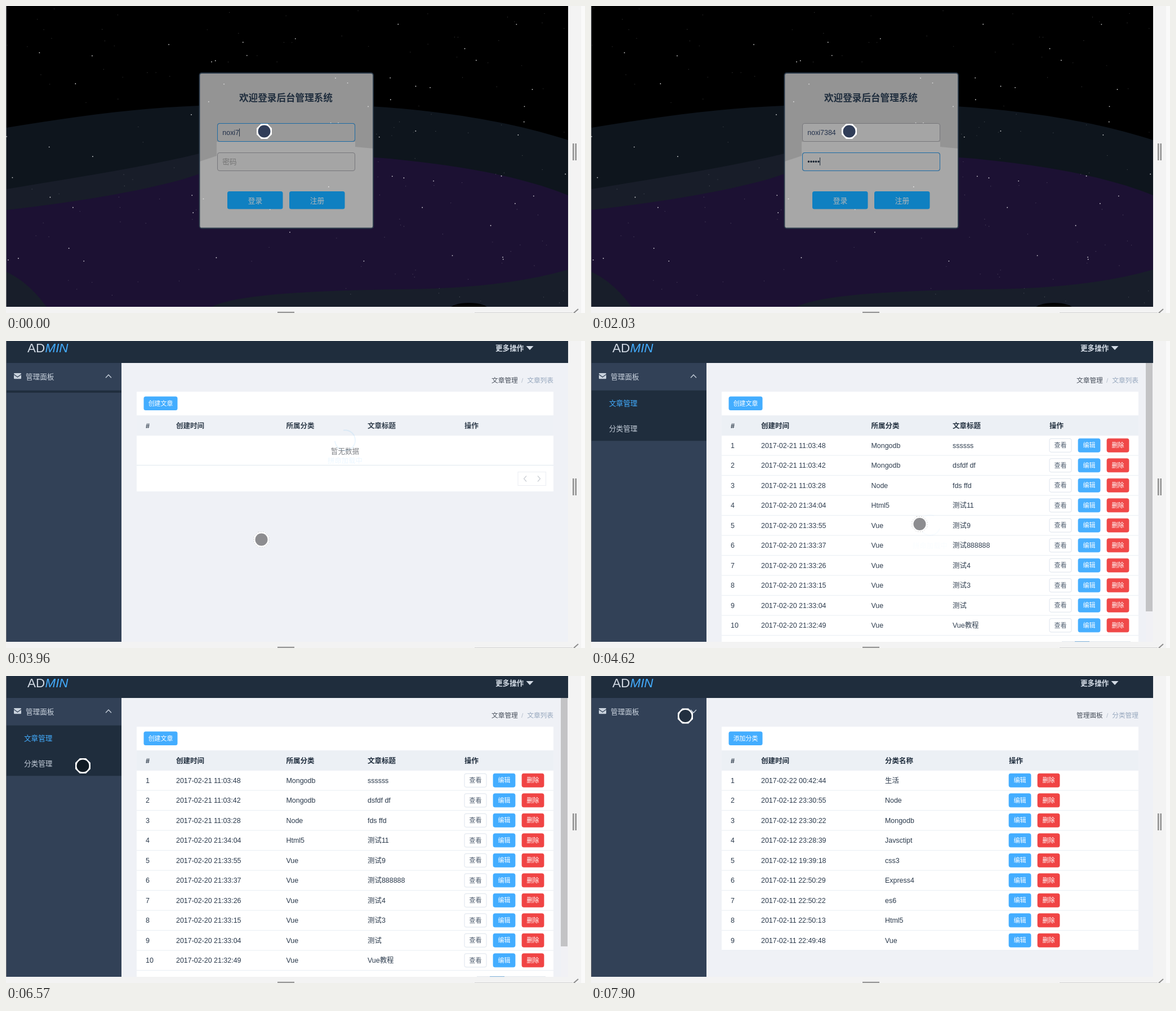
An HTML page that plays this animation: 1028 by 545 pixels, repeating every 8000 ms.

```html
<!DOCTYPE html>
<html lang="zh">
<head>
<meta charset="utf-8">
<style>
html, body { margin: 0; width: 100%; height: 100%; overflow: hidden; background: #f3f3f3; }
#stage { display: block; width: 100vw; height: 100vh; }
text { font-family: "Liberation Sans", "Noto Sans CJK SC", "Noto Sans CJK", sans-serif; white-space: pre; }
</style>
</head>
<body>
<svg id="stage" viewBox="0 0 1028 545"></svg>
<script>
const LOOP = 8000, LOGIN_END = 3960, SWITCH = 6850;
const NAVY = '#1f2d3d', SLATE = '#324157', BLUE = '#43adff', RED = '#f04444';
const MID = 'text-anchor="middle"', BOLD = 'font-weight="bold"';

const articles = `2017-02-21 11:03:48|Mongodb|ssssss
2017-02-21 11:03:42|Mongodb|dsfdf df
2017-02-21 11:03:28|Node|fds ffd
2017-02-20 21:34:04|Html5|测试11
2017-02-20 21:33:55|Vue|测试9
2017-02-20 21:33:37|Vue|测试888888
2017-02-20 21:33:26|Vue|测试4
2017-02-20 21:33:15|Vue|测试3
2017-02-20 21:33:04|Vue|测试
2017-02-20 21:32:49|Vue|Vue教程`;
const categories = `2017-02-22 00:42:44|生活
2017-02-12 23:30:55|Node
2017-02-12 23:30:22|Mongodb
2017-02-12 23:28:39|Javsctipt
2017-02-12 19:39:18|css3
2017-02-11 22:50:29|Express4
2017-02-11 22:50:22|es6
2017-02-11 22:50:13|Html5
2017-02-11 22:49:48|Vue`;

const pages = {
  article: {
    crumbs: ['文章管理', '文章列表'], add: '创建文章', rows: articles.split('\n'),
    heads: ['#', '创建时间', '所属分类', '文章标题', '操作'], cols: [248, 302, 497.5, 642, 814],
    start: LOGIN_END, ready: 4350, pager: true
  },
  category: {
    crumbs: ['管理面板', '分类管理'], add: '添加分类', rows: categories.split('\n'),
    heads: ['#', '创建时间', '分类名称', '操作'], cols: [248, 302, 522, 742],
    start: SWITCH, ready: 7113
  }
};

// Pointer moves: first step, last step, number of steps, target x, y.
const moves = [[3400, 3840, 4, 453.5, 352.5], [4350, 4620, 3, 583.5, 325], [4740, 5320, 5, 889.5, 198.5],
  [5460, 5460, 1, 898.5, 191.5], [5740, 5740, 1, 893.5, 190.5], [6150, 6570, 4, 136.5, 159.5],
  [7244, 7375, 2, 167.5, 71]];

const ramp = (t, a, b) => Math.min(1, Math.max(0, (t - a) / (b - a)));
const ease = k => k * k * (3 - 2 * k);
// Progress in n equal jumps, the first at time a and the last at time b.
const stepped = (t, a, b, n) =>
  t < a ? 0 : t >= b ? 1 : (Math.floor((t - a) / (b - a) * (n - 1) + 0.01) + 1) / n;

const rect = (x, y, w, h, fill, more = '') =>
  `<rect x="${x}" y="${y}" width="${w}" height="${h}" fill="${fill}" ${more}/>`;
const circle = (x, y, r, fill, more = '') => `<circle cx="${x}" cy="${y}" r="${r}" fill="${fill}" ${more}/>`;
const shape = (d, fill, more = '') => `<path d="${d}" fill="${fill}" ${more}/>`;
const line = (d, color, width = 1, more = '') =>
  shape(d, 'none', `stroke="${color}" stroke-width="${width}" ${more}`);
// y is the vertical middle of the text.
const text = (x, y, s, size, fill, more = '') =>
  `<text x="${x}" y="${y + size * 0.37}" font-size="${size}" fill="${fill}" ${more}>${s}</text>`;

let seed = 7;
const random = () => (seed = seed * 16807 % 2147483647) / 2147483647;
const stars = (n, x, y, w, h, r, alpha) => Array.from({ length: n }, () =>
  circle(x + random() * w, y + random() * h, r, '#fff', `opacity="${alpha}"`)).join('');

const sky = '<svg width="998" height="534">' + rect(1, 0, 997, 534, '#000') +
  shape('M1 216C130 195 250 178 380 176C640 165 850 190 998 238V534H1Z', '#0e151d') +
  shape('M1 325C120 305 250 285 343 262L500 300V534H1Z', '#181d29') +
  shape('M1 362C130 348 280 322 343 298C480 262 600 262 700 273C830 286 930 308 998 336V534H1Z', '#1c1133') +
  shape('M1 472Q40 490 72 534H1Z M365 534Q420 506 700 503Q880 502 998 468V534Z', '#181e2a') +
  '<ellipse cx="822" cy="538" rx="34" ry="11"/>' +
  stars(28, 1, 20, 996, 230, 0.9, 0.8) + stars(34, 1, 250, 996, 220, 0.9, 0.8) +
  stars(150, 1, 0, 996, 530, 0.6, 0.25) + '</svg>';

const loginButton = (x, label) =>
  rect(x, 329, 98.5, 31.5, '#0f80c1', 'rx="3.5"') + text(x + 49.5, 345, label, 12.7, '#b4b8ba', MID);
const card = rect(343.5, 119, 308.5, 275.5, '#949494', 'rx="4"') +
  shape('M344 276L374 266V241H620V250L652 253V394H344Z', '#a7a7a7') +
  rect(343.5, 119, 308.5, 275.5, 'none', 'rx="4" stroke="#2c3b4b" stroke-width="1.8"') +
  stars(12, 350, 125, 295, 260, 0.9, 0.7) +
  text(497, 163, '欢迎登录后台管理系统', 16.6, NAVY, MID + BOLD) +
  loginButton(393, '登录') + loginButton(503, '注册');

function login(t) {
  const size = 12.44, left = 384.3;
  const chars = Math.min(8, 5 + Math.floor((t + 50) / 200));
  const dots = t < 1540 ? 0 : Math.min(7, Math.round((t - 1540) / 760 * 6) + 1);
  const focus = stepped(t, 950, 1080, 2);
  const field = (y, lit, fill) => rect(375.5, y, 244, 32, fill, 'rx="3.5" stroke="#77777b"') +
    rect(375.5, y, 244, 32, 'none', `rx="3.5" stroke="#1b6ba5" opacity="${lit}"`);
  const caret = (x, y) => rect(x, y - 7, 1, 14, NAVY);
  const blink = (t >= 2730 && t < 3260) || t >= 3840;
  return sky + card +
    field(208.5, 1 - focus, focus ? '#a5a5a5' : '#999') + field(260.5, focus, '#a5a5a5') +
    text(left, 224.5, 'noxi7384'.slice(0, chars), size, '#22304a') +
    (dots ? text(left, 276, '•'.repeat(dots), size, '#15202e') : text(left, 276, '密码', 12.6, '#757575')) +
    (!focus ? caret(left + size * (1.834 + 0.556 * (chars - 4)), 224.5)
      : blink ? '' : caret(left + size * 0.35 * dots, 276));
}

function sidebar(t) {
  const shut = ramp(t, 7507, 7770);
  const height = 90 * ramp(t, 3950, 4190) * (1 - shut);
  const item = (y, s, on) => text(31, y, s, 12.6, on ? BLUE : '#c3ccd8');
  return rect(1, 39, 204, 495, SLATE) +
    rect(14, 57, 13, 10.3, '#c9d2dd', 'rx="1.3"') + line('M13.5 59L20.5 64L27.5 59', SLATE, 1.2) +
    text(35, 63, '管理面板', 12.6, '#cbd4df') +
    line('M177 65.2L182 60L187 65.2', '#c9d2dd', 1.3, `transform="rotate(${180 * shut} 182 62.6)"`) +
    `<svg x="1" y="87.5" width="204" height="${height}">` + rect(0, 0, 204, 90, NAVY) +
    item(22.5, '文章管理', t < SWITCH) + item(67.5, '分类管理', t >= SWITCH) + '</svg>';
}

const header = rect(1, 0, 997, 39, NAVY) +
  text(38, 11.7, 'AD', 22.4, '#d3dbe5') +
  text(69.5, 11.7, 'MIN', 22.4, BLUE, 'font-style="italic"') +
  text(869, 12.5, '更多操作', 12.6, '#d3dbe5', BOLD) +
  shape('M923.5 9H936.5L930 16Z', '#d3dbe5');

function rowButton(x, y, label, fill) {
  const plain = fill === '#fff';
  return rect(x, y - 12, 39, 24, fill, `rx="3" stroke="${plain ? '#d3dce8' : fill}" stroke-width=".8"`) +
    text(x + 19.5, y, label, 11, plain ? '#48576a' : '#fff', MID);
}

function tableRows({ rows, cols, pager }) {
  const actions = [['编辑', BLUE], ['删除', RED]];
  if (pager) actions.unshift(['查看', '#fff']);
  return rows.map((row, i) => {
    const y = 185 + 35.5 * i;
    return [i + 1, ...row.split('|')].map((v, k) => text(cols[k], y, v, 12.44, '#2b3a4c')).join('') +
      rect(232, y + 17.6, 740, 1, '#e9eef3') +
      actions.map(([label, fill], k) => rowButton(cols.at(-1) + 51 * k, y + 0.3, label, fill)).join('');
  }).join('');
}

const emptyTable = text(602, 195, '暂无数据', 12.6, '#74777c', MID) + rect(232, 220, 740, 1, '#dde7ee');
const emptyPager = rect(909, 232.5, 49.5, 24, '#fff', 'stroke="#ebeef3"') +
  line('M924 239.5L919.5 244.5L924 249.5M944 239.5L948.5 244.5L944 249.5', '#c8ccd2', 1.2);
const scrolledEdge = rect(985, 39, 13, 495, '#f1f1f5') + rect(985, 39, 12, 441, '#c3c3c5') +
  rect(836, 533, 122, 1, '#e3e8ee') + rect(859, 533, 26, 1, '#7fb0d8');

function loadingMask(t, { start, ready }, bottom) {
  const alpha = ramp(t, start - 20, start + 240) * (1 - ramp(t, ready - 120, ready + 280));
  const y = (132 + bottom) / 2;
  return `<g opacity="${alpha}">` + rect(232, 132, 740, bottom - 132, '#fff', 'opacity=".9"') +
    `<g transform="translate(602 ${y}) rotate(${t * 0.18})">` +
    line('M0 -18A18 18 0 1 1 -18 0', '#20a0ff', 2, 'stroke-linecap="round"') + '</g>' +
    text(602, y + 36, '拼命加载中', 12.4, '#20a0ff', MID) + '</g>';
}

function content(page, t) {
  const { crumbs, add, rows, heads, cols, pager } = page;
  const loaded = t >= page.ready;
  const bottom = loaded ? 167.5 + 35.45 * rows.length : 220.5;
  const cardEnd = !pager ? bottom : loaded ? 534 : 267;
  return rect(205, 39, 793, 495, '#eff1f6') +
    text(862, 70, crumbs[0], 11.7, '#48505c') + text(915, 70, '/', 11.7, '#b5bfcc') +
    text(972, 70, crumbs[1], 11.7, '#97a8be', 'text-anchor="end"') +
    rect(232, 90, 740, cardEnd - 90, '#fff') +
    rect(244.5, 98.5, 60, 24.5, BLUE, 'rx="3.5"') + text(274.5, 111, add, 10.9, '#fff', MID) +
    rect(232, 132, 740, 36, '#ecf0f5') +
    heads.map((h, i) => text(cols[i], 150, h, 12.5, NAVY, BOLD)).join('') +
    (loaded ? tableRows(page) : emptyTable) +
    (pager ? loaded ? scrolledEdge : emptyPager : '') +
    loadingMask(t, page, bottom);
}

function pointer(t) {
  let x = 458.5, y = 222.5;
  for (const [a, b, n, toX, toY] of moves) {
    const k = ease(stepped(t, a, b, n));
    x += (toX - x) * k;
    y += (toY - y) * k;
  }
  const light = t >= LOGIN_END && x > 205;
  const fill = t < LOGIN_END ? '#303d58' : light ? '#8d8d90' : t < 7900 ? '#101a23' : '#222f3f';
  return `<g transform="translate(${x} ${y})">` +
    shape('M-5.5 -13.5H5.5L13.5 -5.5V5.5L5.5 13.5H-5.5L-13.5 5.5V-5.5Z', '#fff',
      light ? 'stroke="#bbb" stroke-width=".8" stroke-dasharray="1.5 2.5"' : '') +
    circle(0, 0, 11, fill) + '</g>';
}

const chrome = rect(0, 0, 1028, 545, '#f3f3f3') + rect(1021, 0, 7, 545, '#fafafa') +
  rect(0, 0, 1, 534, '#77797d') +
  rect(1006, 244, 2.5, 30, '#8f8f8f') + rect(1010.5, 244, 2.5, 30, '#8f8f8f') +
  rect(482, 542.7, 30, 2.3, '#999') + rect(832, 544, 174, 1, '#d2d2d2') +
  line('M1008 545L1016 538', '#8c8c8c', 2);

function draw(t) {
  const page = t < SWITCH ? pages.article : pages.category;
  const screen = t < LOGIN_END ? login(t) : content(page, t) + sidebar(t) + header;
  return chrome + screen + pointer(t);
}

const stage = document.getElementById('stage');
let shown = '';
function frame() {
  const picture = draw(performance.now() % LOOP);
  if (picture !== shown) stage.innerHTML = shown = picture;
  requestAnimationFrame(frame);
}
frame();
</script>
</body>
</html>
```
